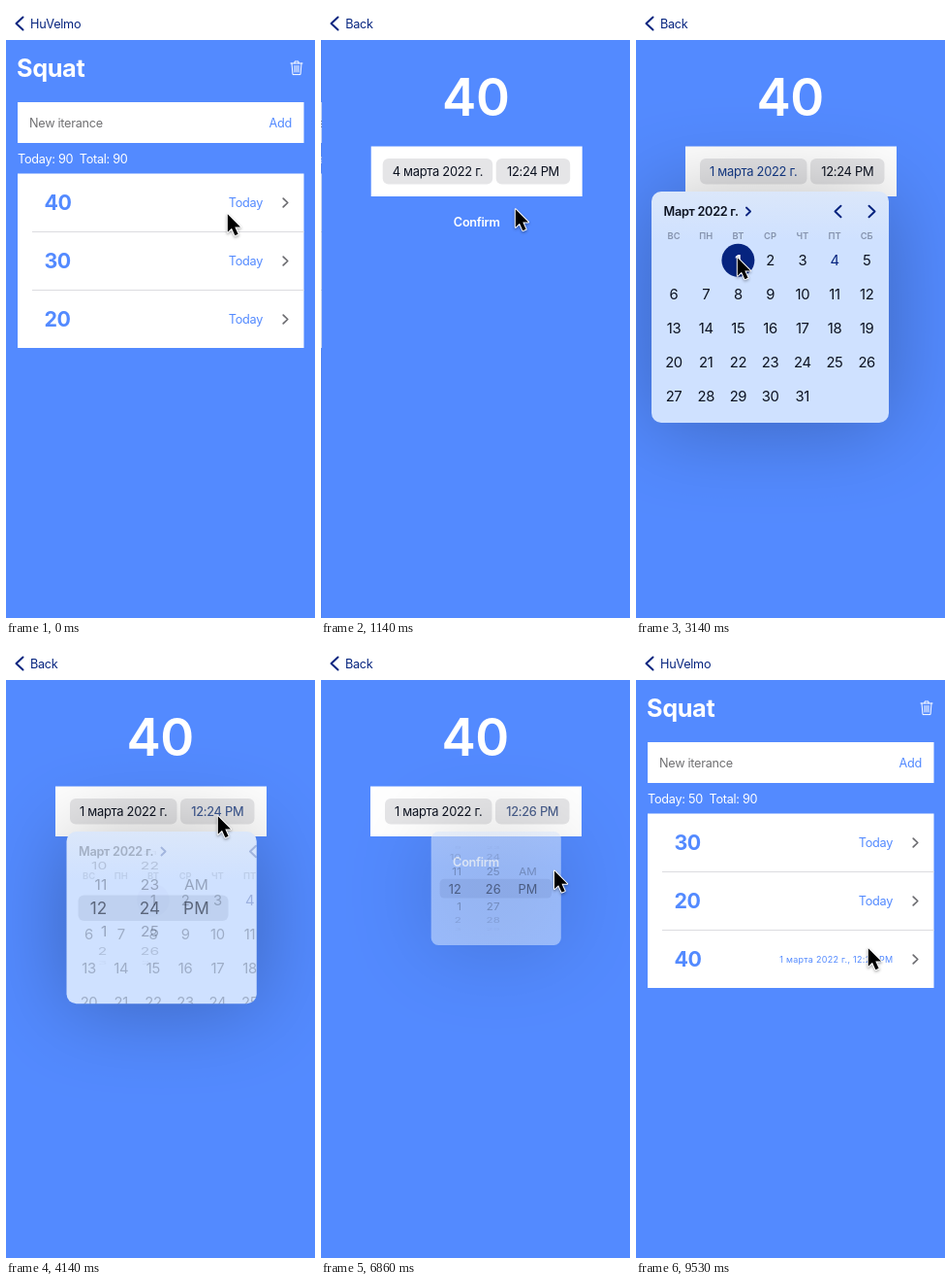
These frames come from a looping animation (319x630 px, 9.77 s). An HTML page with a canvas:

```html
<!DOCTYPE html>
<html lang="en">
<head>
<meta charset="utf-8">
<title>Workout log</title>
<style>
  html, body { margin: 0; width: 100%; height: 100%; overflow: hidden; background: #538aff; }
  canvas { display: block; width: 319px; height: 630px; }
</style>
</head>
<body>
<canvas id="stage"></canvas>
<script>
const W = 319, H = 630, LOOP = 9770;
const BLUE = '#538aff', NAVY = '#06247f', INK = '#0c1220';
const canvas = document.getElementById('stage');
const ctx = canvas.getContext('2d');
const dpr = window.devicePixelRatio || 1;
canvas.width = W * dpr;
canvas.height = H * dpr;

// Moments of the story, in ms
const PUSH = 650, OPEN = 1790, PICK_DAY = 2950, TO_TIME = 4030;
const SPIN = 5640, TIME_SET = 5800, CLOSE = 6780, POP = 6960;

// The pointer glides to each place and rests there
const GLIDE = 300;
const pointerStops = [
  { at: 0, x: 228, y: 213 },
  { at: 430, x: 200, y: 208 },
  { at: 1710, x: 132, y: 172 },
  { at: 2140, x: 140, y: 194 },
  { at: 2700, x: 104, y: 258 },
  { at: 3700, x: 218, y: 174 },
  { at: 4800, x: 166, y: 262 },
  { at: SPIN, x: 172, y: 209 },
  { at: 6290, x: 273, y: 230 },
  { at: 7040, x: 181, y: 231 },
  { at: 8400, x: 127, y: 342 },
  { at: 9480, x: 239, y: 310 }
];

const TRASH = new Path2D('M294 59h12m-8 0v-2h4v2m-7 0l1 11.6h8l1-11.6m-7 2.5v6.5m2-6.5v6.5m2-6.5v6.5');
const ARROW = new Path2D('M0 0V18.5L4.2 14.6 7.6 22 10.8 20.6 7.5 13.3H13.2Z');

const lerp = (a, b, p) => a + (b - a) * p;
const ease = (t, from, to) => {
  const p = Math.min(1, Math.max(0, (t - from) / (to - from)));
  return p * p * (3 - 2 * p);
};
const spring = ms => ms <= 0 ? 0 : 1 - (1 + ms * 0.017) * Math.exp(-ms * 0.017);

function layer(alpha, dx, dy, draw) {
  ctx.save();
  ctx.globalAlpha *= alpha;
  ctx.translate(dx, dy);
  draw();
  ctx.restore();
}

function rect(x, y, w, h, fill, radius = 0) {
  ctx.fillStyle = fill;
  ctx.beginPath();
  ctx.roundRect(x, y, w, h, radius);
  ctx.fill();
}

// y is the middle of the capital letters
function text(str, x, y, color, { size = 12.7, weight = 400, align = 'left', track = -0.022 } = {}) {
  ctx.font = `${weight} ${size}px Inter, sans-serif`;
  ctx.letterSpacing = track * size + 'px';
  ctx.textAlign = align;
  ctx.fillStyle = color;
  ctx.fillText(str, x, y + size * 0.364);
}

function stroke(path, color, width) {
  ctx.strokeStyle = color;
  ctx.lineWidth = width;
  ctx.lineCap = ctx.lineJoin = 'round';
  ctx.stroke(path);
}

// A negative width points left
function chevron(x, y, w, h, color, width) {
  stroke(new Path2D(`M${x - w / 2} ${y - h / 2}l${w} ${h / 2}l${-w} ${h / 2}`), color, width);
}

function listPage(edited) {
  rect(0, 0, W, H, BLUE);
  text('Squat', 11, 64, '#fff', { size: 25.3, weight: 700, track: -0.015 });
  stroke(TRASH, '#fff', 1);
  rect(12, 99, 295.5, 42, '#fff');
  text('New iterance', 24, 120.5, '#707072');
  text('Add', 295, 120.5, BLUE, { align: 'right' });
  text(`Today: ${edited ? 50 : 90}  Total: 90`, 12, 157, '#fff');
  rect(12, 172.5, 295.5, 179.5, '#fff');
  const rows = edited ? [30, 20, 40] : [40, 30, 20];
  rows.forEach((count, i) => {
    const y = 202.5 + i * 60;
    text(count, 39.5, y, BLUE, { size: 21.4, weight: 700 });
    if (edited && count === 40)
      text('1 марта 2022 г., 12:26 PM', 265.5, y, BLUE, { size: 9, align: 'right', track: 0.03 });
    else
      text('Today', 265, y, BLUE, { align: 'right' });
    chevron(288.5, y, 4.6, 8.6, '#6c6c70', 1.7);
    if (i < 2) rect(27, y + 29.5, 280.5, 1, '#dcdce0');
  });
}

function chip(x, right, label, open) {
  rect(x, 157, right - x, 26.5, '#e5e5e7', 6);
  const write = color => text(label, (x + right) / 2, 170.5, color, { size: 12.9, align: 'center' });
  layer(1 - open, 0, 0, () => write(INK));
  layer(open, 0, 0, () => write('#143a88'));
}

function calendar(day, markAlpha) {
  text('Март 2022 г.', 28.5, 211.5, INK, { weight: 600 });
  chevron(116, 211.5, 4.2, 8, NAVY, 1.8);
  chevron(208.5, 211.5, -6, 11.5, NAVY, 2);
  chevron(243.5, 211.5, 6, 11.5, NAVY, 2);
  const column = i => 39 + i * 33.2;
  'ВС ПН ВТ СР ЧТ ПТ СБ'.split(' ').forEach((name, i) =>
    text(name, column(i), 237, '#8593ad', { size: 9.4, weight: 600, align: 'center', track: 0 }));
  for (let d = 1; d <= 31; d++) {
    const x = column((d + 1) % 7), y = 261.7 + Math.floor((d + 1) / 7) * 35;
    const selected = d === day && markAlpha > 0.5;
    if (d === day) layer(markAlpha, 0, 0, () => rect(x - 17, y - 17, 34, 34, NAVY, 17));
    const color = selected ? '#fff' : d === 4 ? NAVY : INK;
    text(d, x, y, color, { size: selected ? 16.4 : 14.8, weight: selected ? 600 : 400, align: 'center' });
  }
}

// Labels wrapped around a cylinder
function wheel(x, align, position, label) {
  for (let i = Math.round(position) - 3; i <= Math.round(position) + 3; i++) {
    const offset = i - position, angle = offset * 0.411, depth = Math.cos(angle);
    const str = label(i), central = Math.abs(offset) < 0.5;
    if (str === undefined || Math.abs(angle) > 1.4) continue;
    layer(central ? 0.88 : 0.55 * depth * depth, x, 270 + 60 * Math.sin(angle), () => {
      ctx.scale(1, depth);
      text(str, 0, 0, INK, { size: central ? 17.2 : 15.6, align, track: 0.01 });
    });
  }
}

function timePicker(minute) {
  rect(12, 256.5, 155, 26.5, 'rgba(10, 25, 70, 0.12)', 6);
  wheel(42, 'right', 12, i => (i + 11) % 12 + 1);
  wheel(86, 'center', minute, i => i);
  wheel(134, 'center', 1, i => ['AM', 'PM'][i]);
}

function popup(t, toTime) {
  const shown = ease(t, OPEN, OPEN + 270) * (1 - ease(t, CLOSE, POP));
  if (!shown) return;
  const x = lerp(16, 78, toTime), right = lerp(261, 258, toTime), bottom = lerp(429, 348, toTime);
  const anchor = lerp(120, 218, toTime), scale = lerp(0.4, 1, shown);
  layer(shown, anchor, 191, () => {
    ctx.scale(scale, scale);
    ctx.translate(-anchor, -191);
    const tint = ctx.createLinearGradient(0, 191, 0, 240);
    tint.addColorStop(0, '#dbe7fa');
    tint.addColorStop(1, '#cfe1ff');
    ctx.save();
    ctx.shadowColor = 'rgba(0, 0, 0, 0.28)';
    ctx.shadowBlur = 90 * dpr;
    ctx.shadowOffsetY = 3 * dpr;
    rect(x, 191, right - x, bottom - 191, tint, 10);
    ctx.restore();
    ctx.clip();
    const rest = 1 - toTime;
    if (rest > 0.01) layer(rest, x - 16, 0, () => calendar(t < PICK_DAY ? 4 : 1, rest ** 2));
    layer(toTime ** 1.6, x, 0, () => timePicker(24 + 2 * ease(t, SPIN - 400, SPIN)));
  });
}

function detailPage(t) {
  const toTime = t < TO_TIME ? 0 : 1 - Math.exp((TO_TIME - t) / 80);
  const dateOpen = t < TO_TIME ? ease(t, OPEN, OPEN + 270) : 0;
  const first = t < PICK_DAY;
  rect(0, 0, W, H, BLUE);
  text('40', 159, 94, '#fff', { size: 53, weight: 600, align: 'center', track: -0.01 });
  rect(51, 144.5, 218, 51.5, '#fff');
  chip(first ? 63 : 66, 176.5, `${first ? 4 : 1} марта 2022 г.`, dateOpen);
  chip(180, 256.5, `12:${t < TIME_SET ? 24 : 26} PM`, toTime * (1 - ease(t, CLOSE, POP)));
  text('Confirm', 160, 222, '#fff', { weight: 600, align: 'center' });
  popup(t, toTime);
}

function navBar(depth) {
  rect(0, 0, W, 35, '#fff');
  chevron(14, 18, -7, 13, NAVY, 2);
  layer(1 - depth, -40 * depth, 0, () => text('HuVelmo', 25, 18.5, NAVY));
  layer(depth, 60 * (1 - depth), 0, () => text('Back', 25, 18.5, NAVY));
}

function pointer(t) {
  const place = pointerStops.reduce((from, to) => {
    const p = ease(t, to.at - GLIDE, to.at);
    return { x: lerp(from.x, to.x, p), y: lerp(from.y, to.y, p) };
  });
  layer(1, place.x + 0.8, place.y + 1.2, () => {
    ctx.shadowColor = 'rgba(0, 0, 0, 0.35)';
    ctx.shadowBlur = 3 * dpr;
    ctx.shadowOffsetY = 1.5 * dpr;
    stroke(ARROW, '#fff', 2);
    ctx.shadowColor = 'transparent';
    ctx.fillStyle = '#000';
    ctx.fill(ARROW);
  });
}

function draw(t) {
  ctx.setTransform(dpr, 0, 0, dpr, 0, 0);
  const popped = t >= POP;
  const depth = popped ? 1 - spring(t - POP) : spring(t - PUSH);
  layer(1, -0.3 * W * depth, 0, () => listPage(popped));
  if (depth > 0 && !popped) rect(0, 0, W, H, `rgba(0, 0, 0, ${0.08 * depth})`);
  if (depth > 0.002) layer(1, W * (1 - depth), 0, () => detailPage(t));
  navBar(depth);
  pointer(t);
}

function tick() {
  draw(performance.now() % LOOP);
  requestAnimationFrame(tick);
}
tick();
</script>
</body>
</html>
```
